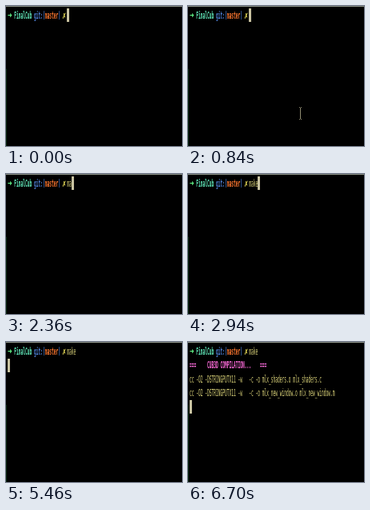
An HTML page with a canvas that plays this animation: 220 px wide and 176 px high, repeating every 8000 ms.

```html
<!DOCTYPE html>
<html lang="en">
<head>
<meta charset="utf-8">
<title>Terminal build</title>
<style>
  html, body { margin: 0; width: 100%; height: 100%; overflow: hidden; background: #000; }
  canvas { display: block; width: 220px; height: 176px; }
</style>
</head>
<body>
<canvas id="stage" width="220" height="176"></canvas>
<script>
const ctx = document.getElementById('stage').getContext('2d');

const LOOP = 8000;
const CELL = 2.75, ROW = 17.5, LEFT = 2, TOP = 3;
const FONT = '12.5px "DejaVu Sans Mono", monospace';
const COLOR = {
  green: '#64ff8c', cyan: '#64f0c0', blue: '#5084dc', orange: '#ff7830',
  yellow: '#f4e85c', text: '#e0d87c', pink: '#ff6cdc', cursor: '#c8c2a0'
};

const TYPED = [2100, 2360, 2540, 2940];
const ENTER = 3900;
const MOUSE = { from: 440, settle: 840, hide: 2100, x: 140, start: 172, end: 135 };

// The whole terminal is squeezed sideways, so one cell ratio serves every span.
function put(col, row, str, color, { bold = false, cells = 1 } = {}) {
  ctx.save();
  ctx.font = (bold ? 'bold ' : '') + FONT;
  ctx.fillStyle = color;
  ctx.translate(LEFT + col * CELL, TOP + Math.floor(row * ROW) + 13);
  ctx.scale(CELL * cells / ctx.measureText('m').width, 1);
  ctx.fillText(str, 0, 0);
  ctx.restore();
}

function prompt() {
  const bold = { bold: true };
  put(0, 0, '➜', COLOR.green, { bold: true, cells: 2 });
  put(3, 0, 'FinalCub', COLOR.cyan, bold);
  put(12, 0, 'git:(', COLOR.blue, bold);
  put(17, 0, 'master', COLOR.orange, bold);
  put(23, 0, ')', COLOR.blue, bold);
  put(24.8, 0, '✗', COLOR.yellow, { bold: true, cells: 1.8 });
}

function banner(row) {
  put(0, row, '===', COLOR.pink, { bold: true });
  put(8, row, 'CUB3D COMPILATION...', COLOR.pink, { bold: true });
  put(32, row, '===', COLOR.pink, { bold: true });
}

function compile(row, name, ext) {
  put(0, row, `cc -O2 -DSTRINGPUTX11 -w   -c -o ${name}.o ${name}.${ext}`, COLOR.text);
}

const OUTPUT = [
  { at: 6460, draw: () => banner(1) },
  { at: 6460, draw: () => compile(2, 'mlx_shaders', 'c') },
  { at: 6560, draw: () => compile(3, 'mlx_new_window', 'm') }
];

function cursor(col, row) {
  ctx.fillStyle = COLOR.cursor;
  ctx.fillRect(Math.round(LEFT + col * CELL), Math.round(TOP + row * ROW), 3, 17);
}

function pointer(t) {
  if (t < MOUSE.from || t >= MOUSE.hide) return;
  const p = Math.min(1, (t - MOUSE.from) / (MOUSE.settle - MOUSE.from));
  const ease = 1 - (1 - p) ** 2;
  const y = Math.round(MOUSE.start + (MOUSE.end - MOUSE.start) * ease);
  ctx.fillStyle = '#8e8a70';
  ctx.fillRect(MOUSE.x, y - 7, 1, 14);
  for (const end of [-8, 7]) {
    ctx.fillRect(MOUSE.x - 1, y + end, 1, 1);
    ctx.fillRect(MOUSE.x + 1, y + end, 1, 1);
  }
}

function edges() {
  ctx.fillStyle = '#8a9086';
  ctx.fillRect(0, 0, 220, 1);
  ctx.fillStyle = '#082810';
  ctx.fillRect(0, 79, 1, 97);
}

function render(t) {
  ctx.fillStyle = '#000';
  ctx.fillRect(0, 0, 220, 176);
  edges();
  prompt();

  const count = TYPED.filter(at => t >= at).length;
  put(27, 0, 'make'.slice(0, count), COLOR.text);

  const lines = OUTPUT.filter(line => t >= line.at);
  lines.forEach(line => line.draw());

  if (t < ENTER) cursor(27 + count, 0);
  else cursor(0, 1 + lines.length);
  pointer(t);
}

const began = performance.now();
function frame() {
  render((performance.now() - began) % LOOP);
  requestAnimationFrame(frame);
}
frame();
</script>
</body>
</html>
```
